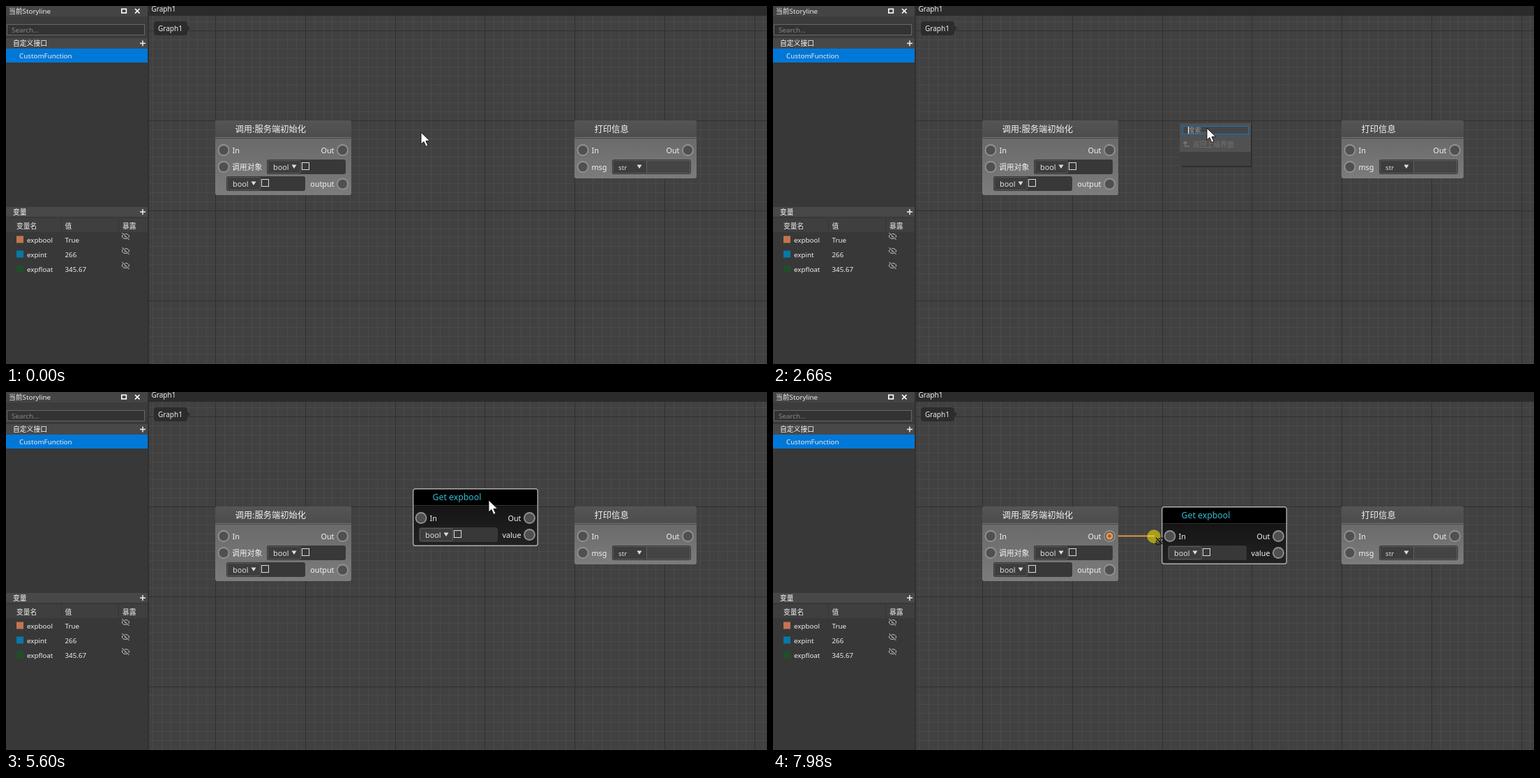
Recreate the animation shown at these times as an HTML page with a canvas. Size 1091 by 513 pixels, loop 8000 ms.

```html
<!DOCTYPE html>
<html lang="zh">
<head>
<meta charset="utf-8">
<title>Node editor</title>
<style>
  html, body { margin: 0; width: 100%; height: 100%; overflow: hidden; background: #404040; }
  canvas { display: block; }
</style>
</head>
<body>
<canvas id="stage" width="1091" height="513"></canvas>
<script>
const LOOP = 8000, STEP = 200 / 3, CELL = 12.875;
const ctx = document.getElementById('stage').getContext('2d');
const FONT = '"Noto Sans", "Noto Sans CJK SC", "Noto Sans CJK", sans-serif';

function rect(x, y, w, h, fill) {
  ctx.fillStyle = fill;
  ctx.fillRect(x, y, w, h);
}
function frame(x, y, w, h, color) {
  ctx.strokeStyle = color;
  ctx.lineWidth = 1;
  ctx.strokeRect(x + .5, y + .5, w - 1, h - 1);
}
function round(x, y, w, h, r, fill) {
  ctx.beginPath();
  ctx.roundRect(x, y, w, h, r);
  ctx.fillStyle = fill;
  ctx.fill();
}
function text(str, x, y, size = 9.8, color = '#eee', align = 'left', weight = 400) {
  ctx.font = `${weight} ${size}px ${FONT}`;
  ctx.textAlign = align;
  ctx.fillStyle = color;
  ctx.fillText(str, x, y);
}
function line(points, color, width = 1) {
  ctx.beginPath();
  points.forEach(([x, y]) => ctx.lineTo(x, y));
  ctx.strokeStyle = color;
  ctx.lineWidth = width;
  ctx.stroke();
}
function polygon(points, fill) {
  ctx.beginPath();
  points.forEach(([x, y]) => ctx.lineTo(x, y));
  ctx.closePath();
  ctx.fillStyle = fill;
  ctx.fill();
}
function disc(x, y, r, fill) {
  ctx.beginPath();
  ctx.arc(x, y, r, 0, 7);
  ctx.fillStyle = fill;
  ctx.fill();
}
function gradient(y0, y1, from, to) {
  const g = ctx.createLinearGradient(0, y0, 0, y1);
  g.addColorStop(0, from);
  g.addColorStop(1, to);
  return g;
}

// ---- Left panel ----
function plus(x, y) {
  rect(x - 4, y - .75, 8, 1.5, '#eee');
  rect(x - .75, y - 4, 1.5, 8, '#eee');
}
function hiddenEye(x, y) {
  ctx.beginPath();
  ctx.ellipse(x, y, 5, 3.5, 0, 0, 7);
  ctx.strokeStyle = '#ccc';
  ctx.lineWidth = 1;
  ctx.stroke();
  disc(x, y, 1.5, '#ccc');
  line([[x - 4, y - 5], [x + 5, y + 5]], '#383838', 2.4);
  line([[x - 5, y - 5], [x + 5, y + 5]], '#ddd');
}
function drawPanel() {
  rect(0, 0, 205, 513, '#383838');
  rect(0, 0, 203, 15, '#444');
  text('当前Storyline', 4, 11);
  ctx.strokeStyle = '#fff';
  ctx.lineWidth = 1.6;
  ctx.strokeRect(165.8, 4.3, 6.6, 5.6);
  line([[185, 4], [191.5, 10.5]], '#fff', 1.7);
  line([[191.5, 4], [185, 10.5]], '#fff', 1.7);
  rect(0, 15, 203, 30, '#3c3c3c');
  rect(1, 26, 198, 16, '#333');
  frame(1, 26, 198, 16, '#686868');
  text('Search...', 8, 38, 9.8, '#888');
  rect(0, 46, 203, 15, '#484848');
  text('自定义接口', 10, 57, 9.8, '#fff', 'left', 500);
  plus(196, 53.5);
  rect(0, 61, 203, 20, '#0078d7');
  text('CustomFunction', 19, 75, 9.8);

  rect(0, 288, 203, 14, '#484848');
  text('变量', 10, 299, 9.8, '#fff', 'left', 500);
  plus(196, 295);
  rect(0, 304, 203, 20, '#3f3f3f');
  [['变量名', 15], ['值', 84.5], ['暴露', 167]].forEach(([s, x]) => text(s, x, 319));
  rect(79, 305, 1, 18, '#333');
  rect(161, 305, 1, 18, '#333');
  [['expbool', 'True', '#c2754f'], ['expint', '266', '#0878a8'], ['expfloat', '345.67', '#1f4f2a']]
    .forEach(([name, value, color], i) => {
      const y = 339 + 21 * i;
      rect(15, y - 9.5, 10, 10, color);
      text(name, 30, y);
      text(value, 84.5, y);
      hiddenEye(171.5, y - 9);
    });
  rect(203, 0, 2, 513, '#303030');
}

// ---- Graph ----
function drawGrid() {
  rect(205, 0, 886, 513, '#414141');
  const gridLines = (major, draw) => {
    for (let i = -12; i < 64; i++) if ((i % 10 === 0) === major) draw(Math.round(i * CELL));
  };
  for (const major of [false, true]) {
    const color = major ? '#303030' : '#4a4a4a';
    gridLines(major, d => { if (300 + d > 205) rect(300 + d, 13, 1, 500, color); });
    gridLines(major, d => rect(205, 164 + d, 886, 1, color));
  }
  rect(205, 0, 886, 14, '#2b2b2b');
  text('Graph1', 208.5, 8, 10);
  round(212, 22, 48, 20, 4, '#2c2c2c');
  polygon([[260, 28], [264, 32], [260, 36]], '#2c2c2c');
  text('Graph1', 218, 36, 10);
}
function port(x, y, linked) {
  disc(x, y, 8.4, '#929292');
  disc(x, y, 6.6, '#505050');
  if (linked) {
    disc(x, y, 5.2, '#e09a52');
    disc(x, y, 2.2, '#8a6238');
  }
}
function triangle(x, y) {
  polygon([[x - 3.5, y - 2.5], [x + 3.5, y - 2.5], [x, y + 3]], '#ddd');
}
function field(x, y, type) {
  const isBool = type === 'bool';
  round(x, y, 113, 21, 3, '#383838');
  ctx.beginPath();
  ctx.roundRect(x + 1.5, y + 1.5, isBool ? 47 : 48, 18, 2);
  ctx.fillStyle = '#3d3d3d';
  ctx.fill();
  ctx.strokeStyle = '#5a5a5a';
  ctx.lineWidth = 1;
  ctx.stroke();
  text(type, x + 9, y + 14.5, isBool ? 10.8 : 9.8, '#ddd');
  triangle(x + 39, y + 10);
  if (isBool) frame(x + 50, y + 4, 11, 11, '#ddd');
  else {
    rect(x + 50, y + 2, 61, 17, '#444');
    frame(x + 49, y + 1, 63, 19, '#5e5e5e');
  }
}
function label(str, x, y, align = 'left') {
  text(str, x, y, 10.8, '#f2f2f2', align);
}
function node(x, y, w, h, title, selected, linked) {
  round(x, y, w, h, 3, selected ? gradient(y + 25, y + h, '#151515', '#222')
    : gradient(y + 25, y + h, '#6a6a6a', '#7c7c7c'));
  round(x, y, w, 25, [3, 3, 0, 0], selected ? '#000' : gradient(y, y + 25, '#555', '#4c4c4c'));
  rect(x, y + 24, w, 1, selected ? '#333' : '#787878');
  rect(x, y + 25, w, 1, selected ? '#111' : '#444');
  if (selected) {
    ctx.beginPath();
    ctx.roundRect(x + .7, y + .7, w - 1.4, h - 1.4, 3);
    ctx.strokeStyle = '#b0b0b0';
    ctx.lineWidth = 1.4;
    ctx.stroke();
  }
  text(title, x + 28.5, y + 17, 12.3, selected ? '#35bcd2' : '#f4f4f4');
  port(x + 12, y + 42.5);
  port(x + w - 12.5, y + 42.5, linked);
  label('In', x + 24.5, y + 47);
  label('Out', x + w - 24.5, y + 47, 'right');
}
function drawFixedNodes(linked) {
  node(300, 164, 195, 107, '调用:服务端初始化', false, linked);
  port(312, 230.5);
  label('调用对象', 324, 234.5);
  field(374, 220, 'bool');
  field(316, 244, 'bool');
  label('output', 470.5, 259, 'right');
  port(482.5, 255);

  node(815, 164, 175, 83, '打印信息');
  port(827, 230.5);
  label('msg', 839.5, 235);
  field(869, 220, 'str');
}
function drawVariableNode(x, y) {
  node(x, y, 180, 83, 'Get expbool', true);
  field(x + 9, y + 56, 'bool');
  label('value', x + 155.5, y + 71, 'right');
  port(x + 167.5, y + 66.5);
}

// ---- Popup menu ----
const CATEGORIES = ['行为节点', '基础节点', '装饰节点', '旧版节点', '事件节点', '逻辑节点', '参数节点',
  '零件节点', '零件界面节点', 'SdkNode', 'Test', '参数', '拷贝模板', '变量'];

function menuBox(w, h) {
  rect(586, 171, w, h, 'rgba(0,0,0,.4)');
  rect(583, 168, w, h, '#515151');
  frame(583, 168, w, h, '#3c3c3c');
}
function searchField(w, query, caretX) {
  rect(587, 172, w, 12, '#454545');
  frame(587, 172, w, 12, '#0878d0');
  text(query || '搜索...', 594.5, 182, 9.8, query ? '#eee' : '#999');
  if (caretX) rect(caretX, 173, 1, 10, '#eee');
}
function backRow() {
  line([[597, 201], [591, 201], [591, 195]], '#777', 1.5);
  polygon([[587.5, 197], [591, 193], [594.5, 197]], '#777');
  text('返回上级界面', 602, 201.5, 9.8, '#737373');
}
function drawFullMenu(caret) {
  menuBox(103, 360);
  searchField(95, '', caret && 595);
  backRow();
  frame(588, 212, 7, 9, '#777');
  rect(591, 215, 7, 8, '#515151');
  frame(591, 215, 7, 8, '#777');
  text('粘贴', 602, 221.5, 9.8, '#737373');
  rect(584, 228, 101, 1, '#363636');
  CATEGORIES.forEach((name, i) => {
    const y = 252 + 20.12 * i;
    text(name, 602, y + 3.7, 9.8, '#e6e6e6');
    polygon([[678, y - 3.5], [682, y], [678, y + 3.5]], '#aaa');
  });
}
function drawShrinkingMenu() {
  rect(586, 171, 100, 60, '#2e2e2e');
  rect(583, 209, 102, 20, '#404040');
  rect(583, 168, 102, 41, '#515151');
  searchField(95, '', 595);
  backRow();
}
function drawResults(query, height, caretX) {
  menuBox(106, height);
  searchField(98, query, caretX);
  ['expbool', 'expint', 'expfloat'].forEach((name, i) => {
    const y = 198 + 20.1 * i;
    if (!i) rect(584, 188, 104, 20, '#0070ea');
    line([[594, y + 5], [588, y + 5], [588, y - 5], [594, y - 5], [597, y - 2], [597, y]], '#c4cede');
    ctx.beginPath();
    ctx.arc(596.5, y + 3, 2.5, 0, 7);
    ctx.stroke();
    text('获取 ' + name, 602, y + 3.7);
  });
}
function drawMenu(t) {
  if (t < 1260 || t >= 4670) return;
  if (t < 2660) drawFullMenu(t < 1730 || t >= 2230);
  else if (t < 2730) drawShrinkingMenu();
  else if (t < 3260) drawResults('获取', 175, 615);
  else drawResults('获取 ', 81, 617);
}

// ---- Pointer ----
// Each key: time, x, y
const PATH = [[0, 595, 181], [70, 595, 181], [340, 583, 170], [1260, 583, 170], [1330, 622, 175],
  [3600, 622, 175], [3940, 641, 200], [4270, 641, 201], [5200, 641, 201], [5260, 622, 212],
  [5330, 679, 136], [5470, 679, 136], [5600, 692, 155], [5860, 692, 155], [6200, 672, 166],
  [6340, 670, 174], [6540, 667, 183], [6870, 667, 183], [7100, 635, 180], [7400, 540, 198],
  [7640, 485, 207], [7700, 485, 207], [7930, 547, 208], [LOOP, 547, 208]];

function pointerAt(t) {
  const i = PATH.findIndex(key => key[0] > t);
  const [t0, x0, y0] = PATH[i - 1], [t1, x1, y1] = PATH[i];
  const k = Math.min(1, (Math.floor((t - t0) / STEP + .02) * STEP) / (t1 - t0));
  return [Math.round(x0 + (x1 - x0) * k), Math.round(y0 + (y1 - y0) * k)];
}
const within = (t, a, b) => t >= a && t < b;
const pressed = t => within(t, 800, 1060) || within(t, 4470, 4670) || within(t, 5860, 6610) || t >= 7640;

function drawPointer(t) {
  const [x, y] = pointerAt(t);
  if (pressed(t)) disc(x - 1, y - 1, 9.7, 'rgba(255,240,0,.53)');
  if (within(t, 1330, 2660)) {
    for (const [color, grow] of [['#fff', 1], ['#000', 0]]) {
      rect(x - 1 - grow, y - 9 - grow, 2 + 2 * grow, 18 + 2 * grow, color);
      for (const end of [-10, 8]) rect(x - 4 - grow, y + end - grow / 2, 8 + 2 * grow, 2 + grow, color);
    }
  } else if (t >= 7700) {
    ctx.save();
    ctx.translate(x + 7, y + 6);
    ctx.rotate(-Math.PI / 4);
    ctx.beginPath();
    ctx.ellipse(0, 0, 6, 3.5, 0, 0, 7);
    ctx.strokeStyle = '#111';
    ctx.lineWidth = 1.6;
    ctx.setLineDash([2, 1]);
    ctx.stroke();
    ctx.restore();
    line([[x + 2, y + 1], [x + 11, y + 10]], '#111', 1.2);
  } else {
    ctx.save();
    ctx.translate(x, y);
    const arrow = [[0, 0], [0, 17], [4, 13.5], [7, 20.5], [10, 19], [7, 12.5], [12.5, 12]];
    polygon(arrow, '#fff');
    line([...arrow, arrow[0]], '#111', 1);
    ctx.restore();
  }
}

function render(now) {
  const t = now % LOOP, linked = t >= 7700;
  drawGrid();
  drawPanel();
  if (linked) {
    const [x] = pointerAt(t);
    line([[482, 206.3], [Math.max(482, x), 206.3]], '#eda343', 1.7);
  }
  drawFixedNodes(linked);
  if (t >= 4800) {
    const columns = t < 6060 ? 0 : t < 6200 ? 1 : 2;
    const rows = t < 6200 ? 0 : t < 6410 ? 1 : 2;
    drawVariableNode(Math.round(583 - columns * CELL), Math.round(138 + rows * CELL));
  }
  drawMenu(t);
  drawPointer(t);
  requestAnimationFrame(render);
}
requestAnimationFrame(render);
</script>
</body>
</html>
```
